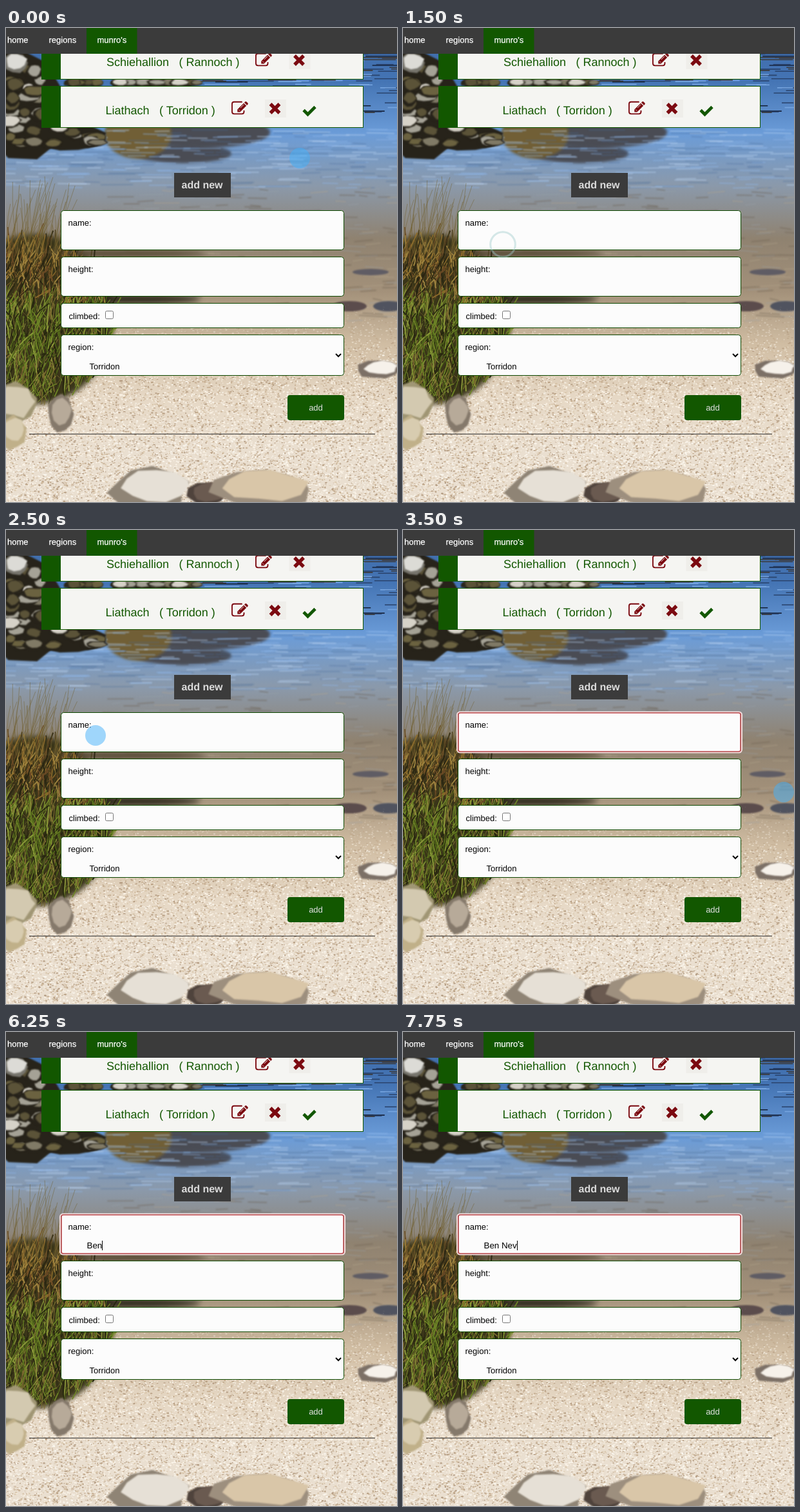
Animation, 607 px wide and 736 px high, one loop 8 s. Source, as an HTML page with a canvas:

```html
<!DOCTYPE html>
<html lang="en">
<head>
<meta charset="utf-8">
<title>munro's</title>
<style>
  html, body { margin: 0; width: 100%; height: 100%; overflow: hidden; }
  canvas, svg { position: absolute; left: 0; top: 0; width: 607px; height: 736px; }
  text { font-family: "Liberation Sans", Arial, sans-serif; font-size: 13px; white-space: pre; text-rendering: geometricPrecision; }
  .nav { fill: #fff; stroke: #fff; stroke-width: .25; }
  .munro { font-size: 18px; fill: #125700; }
  .card { fill: #f5f5f2; stroke: #125700; }
  .green { fill: #125700; }
  .field { fill: #fcfcfc; stroke: #0d4700; }
  .line { fill: none; stroke: #7b0910; }
</style>
</head>
<body>
<canvas id="photo" width="607" height="736"></canvas>
<svg viewBox="0 0 607 736">
  <defs>
    <g id="edit" transform="scale(.0145)">
      <path class="line" stroke-width="128" d="M1150 192H288Q64 192 64 416V1248Q64 1472 288 1472H1120Q1344 1472 1344 1248V1100"/>
      <path fill="#7b0910" d="M1312 320L1600 608L928 1280H640V992ZM1376 256L1468 164Q1536 120 1604 164L1756 316Q1800 384 1756 452L1664 544Z"/>
      <path stroke="#f5f5f2" stroke-width="60" d="M1310 480L960 830M770 1010L910 1150"/>
    </g>
    <g id="cross">
      <rect x="-6" y="-6" width="33" height="28" fill="#efeeea"/>
      <path class="line" stroke-width="5.400" d="M2.500 1L16.500 15M16.500 1L2.500 15"/>
    </g>
  </defs>

  <rect class="card" x="55.500" y="30.500" width="499" height="49"/>
  <rect class="green" x="55" y="30" width="30" height="50"/>
  <text class="munro" x="156" y="59">Schiehallion</text>
  <text class="munro" x="268.500" y="59">( Rannoch )</text>
  <use href="#edit" x="387" y="37"/>
  <use href="#cross" x="445.500" y="42"/>

  <rect class="card" x="55.500" y="90.500" width="499" height="64"/>
  <rect class="green" x="55" y="90" width="30" height="65"/>
  <text class="munro" x="154.500" y="134">Liathach</text>
  <text class="munro" x="238" y="134">( Torridon )</text>
  <use href="#edit" x="350" y="112"/>
  <use href="#cross" x="408" y="117"/>
  <path d="M462 127.500L468.500 134L480 122.500" fill="none" stroke="#125700" stroke-width="4.800"/>

  <rect width="607" height="40" fill="#3b3b3b"/>
  <rect class="green" x="125" width="78.500" height="40"/>
  <text class="nav" x="2" y="23">home</text>
  <text class="nav" x="66.500" y="23">regions</text>
  <text class="nav" x="141.500" y="23">munro's</text>

  <rect x="261" y="225" width="88" height="38" fill="#3b3b3b"/>
  <text x="272.500" y="249" fill="#dcdcdc" style="font-size:16px;font-weight:bold">add new</text>

  <rect class="field" x="85.500" y="283.500" width="439" height="61" rx="4"/>
  <g id="focus" fill="none">
    <rect x="84" y="282.500" width="442" height="63" rx="4.500" stroke="#f6dedf" stroke-width="2"/>
    <rect x="86" y="284" width="438" height="60" rx="3" stroke="#c8505a" stroke-width="1.600"/>
  </g>
  <rect class="field" x="85.500" y="355.500" width="439" height="61" rx="4"/>
  <rect class="field" x="85.500" y="427.500" width="439" height="38" rx="4"/>
  <rect class="field" x="85.500" y="476.500" width="439" height="63" rx="4"/>
  <text x="96.500" y="307">name:</text>
  <text x="96.500" y="379">height:</text>
  <text x="97.500" y="452">climbed:</text>
  <text x="96.500" y="500">region:</text>
  <text x="129.500" y="530">Torridon</text>
  <rect x="154.500" y="439.500" width="12" height="12" rx="2" fill="#fff" stroke="#767676"/>
  <path d="M512 506L516 510L520 506" fill="none" stroke="#000" stroke-width="2"/>
  <rect class="green" x="437" y="570" width="88" height="39" rx="4"/>
  <text x="481" y="594" text-anchor="middle" fill="#e0e0e0">add</text>
  <path d="M36 630.500H573" stroke="#333"/>

  <text id="typed" x="125.500" y="336" style="font-size:13.333px"></text>
  <rect id="caret" y="324" width="1" height="15"/>
  <circle id="dot" r="16" fill="#41affa" fill-opacity=".5"/>
  <circle id="ring" fill="none" stroke="#9cc8c8" stroke-width="3"/>
</svg>
<script>
const ctx = document.getElementById('photo').getContext('2d');
const $ = id => document.getElementById(id);

let seed = 11;
const rnd = () => (seed = (seed * 16807) % 2147483647) / 2147483647;
const between = (a, b) => a + (b - a) * rnd();
const pick = list => list[Math.floor(rnd() * list.length)];
const repeat = (n, draw) => { for (let i = 0; i < n; i++) draw(i); };

function oval(color, x, y, rx, ry) {
  ctx.fillStyle = color;
  ctx.beginPath();
  ctx.ellipse(x, y, rx, ry, 0, 0, 7);
  ctx.fill();
}

function stroke(color, width, x, y, dx, dy, bend = 0) {
  ctx.strokeStyle = color;
  ctx.lineWidth = width;
  ctx.beginPath();
  ctx.moveTo(x, y);
  ctx.quadraticCurveTo(x + dx / 2 - bend, y + dy / 2, x + dx, y + dy);
  ctx.stroke();
}

function jagged(color, x, y, rx, ry) {
  ctx.fillStyle = color;
  ctx.beginPath();
  for (let a = 0; a < 6.28; a += .6) {
    const k = between(.82, 1.1);
    ctx.lineTo(x + rx * k * Math.cos(a), y + ry * k * Math.sin(a));
  }
  ctx.fill();
}

// A shaded stone with its lit face towards the upper right.
function rock(x, y, rx, ry, light, dark) {
  jagged(dark, x, y, rx, ry);
  jagged(light, x + rx * .12, y - ry * .15, rx * .82, ry * .75);
}

function gradient(x, y, ...colors) {
  const g = ctx.createLinearGradient(0, 0, x, y);
  colors.forEach((c, i) => g.addColorStop(i / (colors.length - 1), c));
  ctx.fillStyle = g;
  ctx.fillRect(0, 40, 607, 696);
}

function drawWater() {
  gradient(0, 736, '#3f6ba8', '#4474b4', '#6b9cd8', '#8b99aa', '#8f8270',
    '#a3917a', '#d0bda3', '#e6d8c5', '#eadfd0', '#eadfd0');
  repeat(110, () => stroke(pick(['#16233c', '#2a446e', '#3b3a3c', '#76a5e0']), 1.6,
    between(300, 600), 40 + 95 * rnd() ** 1.2, between(15, 60), 0));
  ctx.filter = 'blur(2px)';
  oval('#4a4c54', 305, 162, 105, 24);
  oval('#4a4c54', 275, 195, 75, 15);
  oval('#715f36', 205, 165, 52, 38);
  ctx.filter = 'blur(1px)';
  repeat(260, () => stroke(pick(['#b9d2f099', '#4a6b9a66', '#8fb8ec88']), 1.5,
    between(-30, 600), between(157, 250), between(15, 60), between(-1, 1)));
  repeat(220, () => stroke(pick(['#b4a48c66', '#6a5d4e66', '#9aa2ac55']), 1.8,
    between(150, 600), between(250, 460), between(10, 45), between(-3, 3)));
  oval('#5f5c64', 566, 379, 28, 5);
  oval('#5b4c4c', 533, 432, 27, 8);
  oval('#50535f', 594, 432, 24, 8);
}

function drawFarRocks() {
  const lights = ['#a5a296', '#807a66', '#6b6240', '#d6d2c8', '#5b5338'];
  jagged('#27231a', 20, 115, 75, 92);
  jagged('#27231a', 95, 170, 60, 25);
  repeat(26, () => rock(between(0, 55), between(50, 185), between(9, 22), between(6, 13), pick(lights), '#27231a'));
  repeat(9, () => rock(between(60, 140), between(155, 180), between(10, 20), between(5, 10), pick(lights), '#27231a'));
  repeat(26, () => rock(between(85, 300), 85, between(8, 22), between(4, 8), pick(lights), '#2b271d'));
  rock(14, 54, 20, 16, '#dcdbd6', '#77756d');
}

function drawBeach() {
  ctx.filter = 'none';
  const pebbles = ['#fffdf8', '#fff8ec', '#fff8ec', '#d3bda0', '#bb9f80', '#a68b6f'];
  repeat(15000, () => {
    const y = 430 + 306 * rnd() ** .7;
    ctx.globalAlpha = Math.min(.7, (y - 425) / 140);
    oval(pick(pebbles), between(0, 607), y, between(.6, 2), between(.5, 1.3));
  });
  ctx.globalAlpha = 1;
}

function drawGrass() {
  ctx.filter = 'blur(4px)';
  oval('#3a3519', 45, 452, 122, 132);
  oval('#2f2a1c', 190, 421, 112, 7);
  oval('#5a4d38', 180, 350, 130, 6);
  ctx.filter = 'none';
  const dry = ['#8d6c2c', '#a08540', '#4a3d1c', '#6b4a25', '#2a2512'];
  const fresh = ['#6d8426', '#8c9a3a', '#4d6118', '#26260f', '#7a6a30'];
  repeat(1300, () => {
    const a = between(0, 6.28), r = Math.sqrt(rnd());
    const x = 45 + 115 * r * Math.cos(a), y = 468 + 122 * r * Math.sin(a);
    stroke(pick(y < 430 ? dry : fresh), between(.6, 2), x, y, between(-14, 24), -between(12, 48), between(-6, 6));
  });
  repeat(60, () => stroke('#71602f99', .8, between(0, 80), 350, between(-10, 35), -between(40, 120), between(-5, 10)));
}

function drawNearStones() {
  ctx.filter = 'blur(1px)';
  rock(12, 585, 35, 34, '#d3c9b0', '#a09674');
  rock(10, 628, 22, 26, '#d8ccb0', '#c0b089');
  rock(84, 599, 20, 29, '#b7aa99', '#85796b');
  rock(578, 530, 32, 15, '#f6f1ea', '#7c7066');
  rock(222, 716, 62, 36, '#e6e0d6', '#8f8475');
  rock(312, 724, 30, 20, '#6a5a50', '#4f433c');
  rock(395, 716, 78, 32, '#d9c6a8', '#9d8f7e');
  ctx.filter = 'none';
}

// Pointer stops: time, x, y and the easing on the way there.
const easeOut = p => 1 - (1 - p) ** 3.4;
const easeIn = p => p * p;
const linear = p => p;
const stops = [
  [0, 456, 202, linear], [1250, 155, 320, easeOut], [1500, 155, 320, linear], [2500, 139, 319, easeIn],
  [3000, 139, 319, linear], [3250, 281, 362, linear], [3500, 591, 407, linear]
];
const presses = [[1500, 2250], [2750, 3250]];

function pointerAt(t) {
  const i = stops.findIndex(s => s[0] >= t);
  if (i < 1) return stops[0].slice(1, 3);
  const [t0, x0, y0] = stops[i - 1], [t1, x1, y1, ease] = stops[i];
  const p = ease((t - t0) / (t1 - t0));
  return [x0 + (x1 - x0) * p, y0 + (y1 - y0) * p];
}

// The picture is held for 250 ms, or 500 ms in the slower middle part.
function held(t) {
  const slow = t >= 3750 && t < 7250;
  return slow ? 3750 + Math.floor((t - 3750) / 500) * 500 : Math.floor(t / 250) * 250;
}

const set = (el, attrs) => Object.entries(attrs).forEach(([k, v]) => el.setAttribute(k, v));
const show = (el, on) => set(el, { visibility: on ? 'visible' : 'hidden' });

function render(time) {
  const t = held(time);
  const present = t <= 3500;
  const [cx, cy] = pointerAt(Math.min(t, 3500));
  const press = presses.find(([from, to]) => t >= from && t < to);
  show($('dot'), present && !press);
  show($('ring'), present && press);
  set($('dot'), { cx, cy });
  if (press) {
    const age = Math.min(1, (t - press[0]) / 250);
    set($('ring'), { cx, cy: cy + 16, r: 19.3 + age, opacity: .42 - .12 * age });
  }

  const count = Math.max(0, Math.floor((t - 5560) / 340) + 1);
  const value = 'Ben Nev'.slice(0, count);
  if ($('typed').textContent !== value) $('typed').textContent = value;

  const focused = t >= 2750;
  show($('focus'), focused);
  show($('caret'), focused && (value || Math.floor((t - 2750) / 500) % 2 === 0));
  const end = value ? $('typed').getComputedTextLength() : 0;
  set($('caret'), { x: Math.round(125.5 + end) });
}

function tick(now) {
  render(now % 8000);
  requestAnimationFrame(tick);
}

drawWater();
drawFarRocks();
drawBeach();
drawGrass();
drawNearStones();
render(0);
requestAnimationFrame(tick);
</script>
</body>
</html>
```
